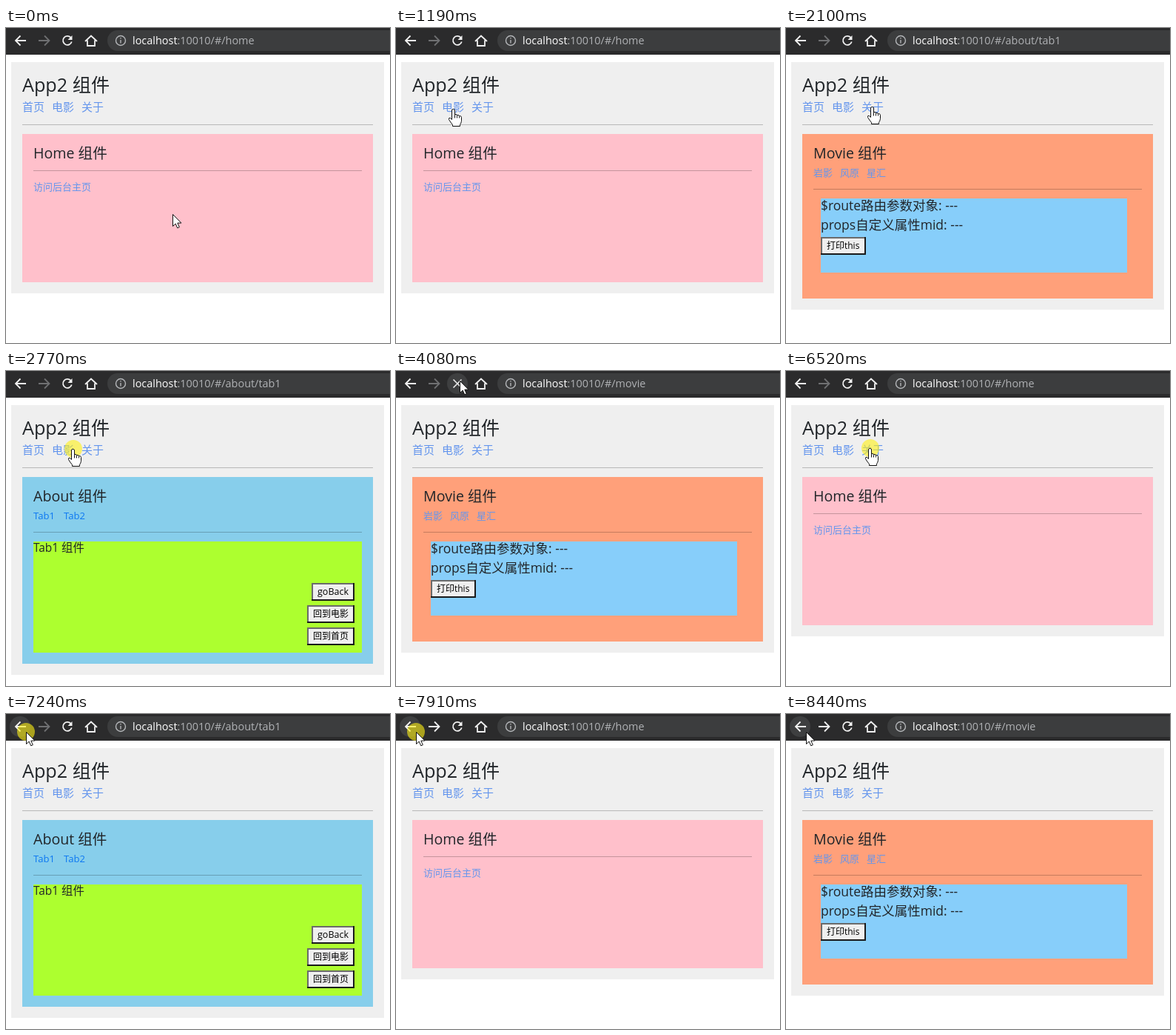
Recreate the animation shown at these times as an HTML page with a canvas. Size 519 by 425 pixels, loop 8520 ms.

```html
<!DOCTYPE html>
<html lang="zh-CN">
<head>
<meta charset="utf-8">
<style>
html, body { margin: 0; width: 100%; height: 100%; overflow: hidden; background: #fff; }
canvas { display: block; }
</style>
</head>
<body>
<canvas id="stage" width="519" height="425"></canvas>
<script>
const g = document.getElementById('stage').getContext('2d');
const LOOP = 8520, HOLD = 80, LAG = 50;
const INK = '#212529', LINK = '#6495ed', ICON = '#f1f1f1';

// Each step: the pointer glides to a place, may press there, may open a page
const steps = [
  { go: 40, stop: 620, x: 47, y: 109, press: 870, open: 'home' },
  { go: 990, stop: 1190, x: 78, y: 109, press: 1370, open: 'movie' },
  { go: 1530, stop: 1820, x: 117, y: 106, press: 2020, open: 'about' },
  { go: 2230, stop: 2600, x: 91, y: 105, press: 2770, open: 'movie' },
  { go: 3100, stop: 3450, x: 86, y: 13, press: 3520 },
  { go: 4970, stop: 5160, x: 50, y: 67 },
  { go: 5500, stop: 5650, x: 45, y: 106, press: 5750, open: 'home' },
  { go: 5960, stop: 6400, x: 114, y: 104, press: 6520, open: 'about' },
  { go: 6700, stop: 7130, x: 27, y: 24, press: 7210, open: 'home', back: true },
  { go: 7800, stop: 7900, x: 27, y: 24, press: 7910, open: 'movie', back: true }
];

const arrow = new Path2D('M0 0V16L3.7 12.6 6.2 18.3 8.8 17.2 6.3 11.6H11.4Z');
const hand = new Path2D('M-3 1.5Q-3 0 -1 0T1 1.5V8Q1 7 2.5 7T4 8.8Q4.2 8 5.5 8T7 9.8' +
  'Q7.2 9 8.3 9.2Q10 9.5 10 11V16Q9.5 19 8 21V23H-2V21Q-5 17.5 -7 14' +
  'Q-7.5 11.5 -5.2 11.8L-3 14ZM1 8V12M4 9V12M7 10V12');

const during = (t, a, b) => t >= a && t < b;
const opened = t => steps.filter(s => s.open && s.press + HOLD <= t).pop() || { open: 'home' };

function box(x, y, r, b, color) {
  g.fillStyle = color;
  g.fillRect(x, y, r - x, b - y);
}
function text(s, x, y, size, color = INK) {
  g.font = size + 'px "Open Sans", "Noto Sans CJK SC", "Noto Sans CJK", sans-serif';
  g.fillStyle = color;
  g.fillText(s, x, y);
}
function disc(x, y, r, color) {
  g.fillStyle = color;
  g.beginPath();
  g.arc(x, y, r, 0, 7);
  g.fill();
}
function line(d, color = ICON, width = 1.8) {
  g.strokeStyle = color;
  g.lineWidth = width;
  g.stroke(new Path2D(d));
}
const rule = (x, y, r) => box(x, y, r, y + 1, 'rgba(0,0,0,.23)');
const links = (names, y, size, gap, color) =>
  names.forEach((s, i) => text(s, (size > 14 ? 22 : 37) + gap * i, y, size, color));

function button(s, x, y, r, size = 12) {
  box(x, y, r, y + 24, '#1a1a1a');
  box(x, y, r - 2, y + 22, '#6b6b6b');
  box(x + 2, y + 2, r - 2, y + 22, '#efefef');
  text(s, x + 8, y + 16, size, '#000');
}

function pointer(t) {
  let x = 225, y = 251;
  for (const s of steps) {
    const u = Math.min(1, Math.max(0, (t - s.go) / (s.stop - s.go)));
    const e = u * u * (3 - 2 * u);
    x += (s.x - x) * e;
    y += (s.y - y) * e;
  }
  return [Math.round(x), Math.round(y)];
}

function toolbar(t, x, y) {
  box(0, 0, 519, 36, '#2b2b2c');
  for (const cx of [19, 83])
    if (Math.hypot(x - cx, y - 17) < 14) disc(cx, 17, 14, '#3e3f40');

  line('M27 17H13M19.5 10.5L13 17L19.5 23.5');
  line('M44 17H58M52 10.5L58.5 17L52 23.5', opened(t - LAG).back ? ICON : '#6f7072');
  if (during(t, 4080, 4970)) {
    line('M77.5 11.5L88.5 22.5M88.5 11.5L77.5 22.5', '#e8e8e8', 1.6);
  } else {
    line('M87.4 12.7A6 6 0 1 0 88.8 18.6');
    g.fillStyle = ICON;
    g.fill(new Path2D('M89.5 10V16H83.5Z'));
  }
  line('M107 18L115 10.5L123 18M110 16.5V24H120V16.5');

  g.fillStyle = '#3c3d3e';
  g.beginPath();
  g.roundRect(137, 3, 420, 28, 14);
  g.fill();
  line('M161.5 17A6.5 6.5 0 1 1 148.5 17A6.5 6.5 0 1 1 161.5 17M155 16V20.5M155 13V14.6', '#b4b6b9', 1.4);
  const host = 'localhost', name = opened(t).open;
  text(host, 171, 22, 14.45, '#fff');
  text(':10010/#/' + name + (name === 'about' ? '/tab1' : ''),
    171 + g.measureText(host).width, 22, 14.45, '#b0b2b5');
}

const pages = {
  home: ['Home', 343, '#ffc0cb', () => {
    rule(37, 192, 481);
    text('访问后台主页', 37, 219, 13, LINK);
  }],
  movie: ['Movie', 365, '#ffa07a', () => {
    links(['岩影', '风原', '星汇'], 200, 13, 36, LINK);
    rule(37, 217, 481);
    box(47, 230, 461, 330, '#87cefa');
    text('$route路由参数对象: ---', 47, 246, 17.5);
    text('props自定义属性mid: ---', 47, 272, 17.5);
    button('打印this', 47, 282, 108);
  }],
  about: ['About', 395, '#87ceeb', () => {
    links(['Tab1', 'Tab2'], 200, 13.1, 41, '#0d78f2');
    rule(37, 217, 481);
    box(37, 230, 481, 380, '#adff2f');
    text('Tab1 组件', 37, 244, 15.4);
    button('goBack', 413, 286, 471, 12.5);
    button('回到电影', 407, 316, 471);
    button('回到首页', 407, 346, 471);
  }]
};

function page(t) {
  const [name, bottom, color, body] = pages[opened(t - LAG).open];
  box(7, 46, 511, bottom + 15, '#efefef');
  text('App2 组件', 22, 86, 25.2);
  links(['首页', '电影', '关于'], 112, 15, 40, LINK);
  rule(22, 130, 496);
  box(22, 143, 496, bottom, color);
  text(name + ' 组件', 37, 176, 19.6);
  body();
}

function draw(t) {
  const [x, y] = pointer(t);
  box(0, 0, 519, 425, '#fff');
  toolbar(t, x, y);
  page(t);
  if (steps.some(s => during(t, s.press, s.press + HOLD))) disc(x, y, 12, 'rgba(255,240,20,.6)');

  const onLink = y > 97 && y < 118 && during(x, 22, 132) && (x - 22) % 40 <= 30;
  const shape = onLink ? hand : arrow;
  g.save();
  g.translate(x + .5, y + .5);
  g.fillStyle = '#fff';
  g.fill(shape);
  g.strokeStyle = '#111';
  g.lineWidth = 1;
  g.lineJoin = 'round';
  g.stroke(shape);
  g.restore();
}

function tick() {
  draw(performance.now() % LOOP);
  requestAnimationFrame(tick);
}
tick();
</script>
</body>
</html>
```
